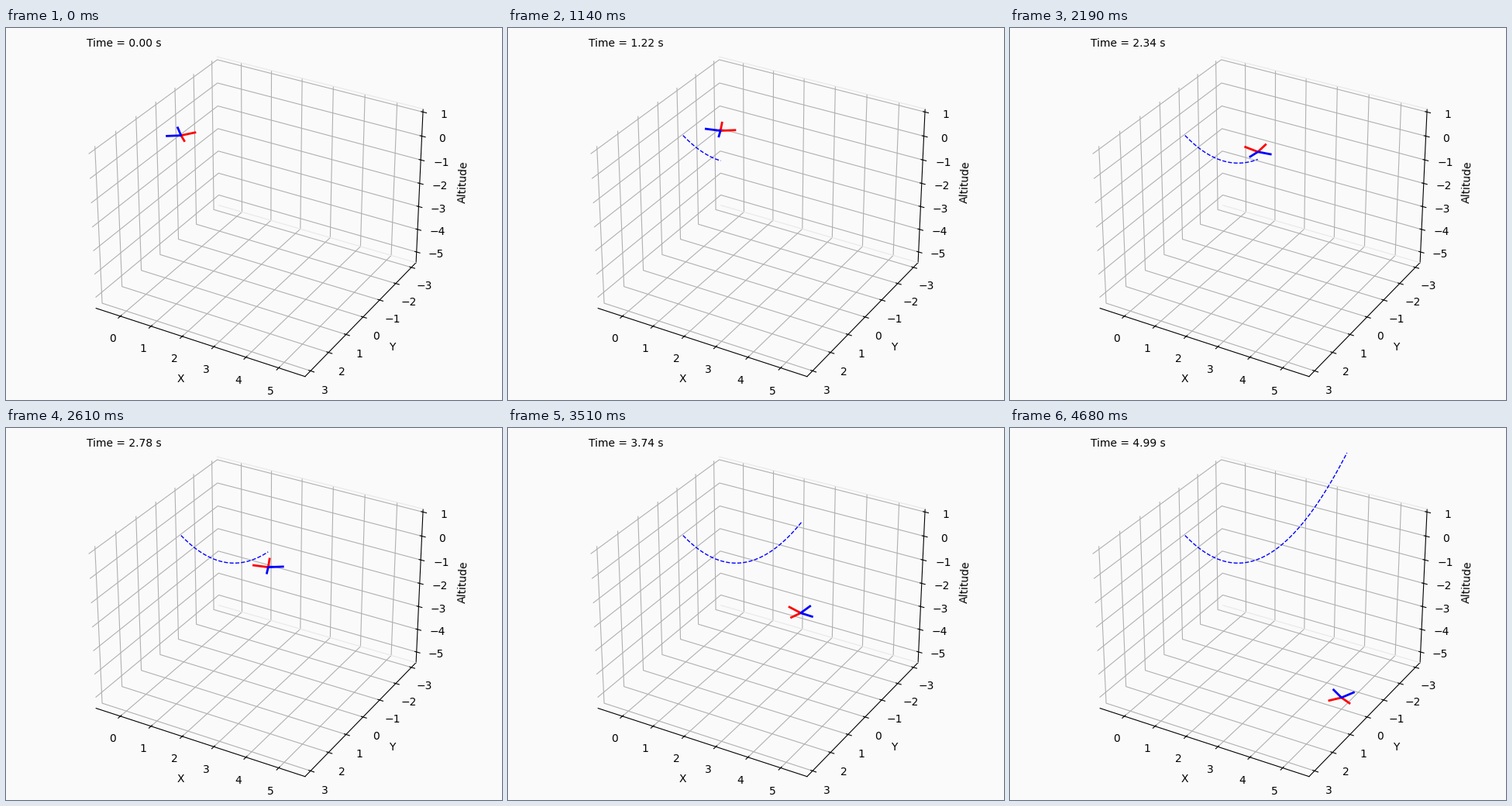
A matplotlib script that plays this animation: 640 px wide and 480 px high, repeating every 4.71 s.

```python
import numpy as np
import matplotlib.pyplot as plt
from matplotlib.animation import FuncAnimation

FRAMES, INTERVAL = 157, 30
STEP = 0.032            # simulated seconds per frame
SUBSTEPS = 8            # trail samples per frame
CLIMB, GRAVITY = 1.0, 0.8
YAW_RATE = -1.0
ARM, MOTOR_HEIGHT = 0.4 * np.sqrt(0.5), 0.05
BACKGROUND = "#fafafa"


def position(t):
    """Ballistic path: constant forward speed, parabolic altitude."""
    t = np.asarray(t, dtype=float)
    return np.array([t, 0 * t, CLIMB * t - GRAVITY * t**2 / 2])


def arms(t, side):
    """Motor, hub, motor polyline; side is 1 for front and -1 for rear."""
    body = np.array([[side, 0, side],
                     [-side, 0, side],
                     [1, 0, 1]]) * [[ARM], [ARM], [MOTOR_HEIGHT]]
    c, s = np.cos(YAW_RATE * t), np.sin(YAW_RATE * t)
    turn = np.array([[c, -s, 0], [s, c, 0], [0, 0, 1]])
    return turn @ body + position(t)[:, None]


fig = plt.figure(figsize=(6.4, 4.8), dpi=100, facecolor=BACKGROUND)
ax = fig.add_axes([0, 0, 1, 1], projection="3d", facecolor=BACKGROUND)

# Cube around the path with half a unit of room on each side
path = position(np.arange(FRAMES) * STEP)
low, high = path.min(axis=1), path.max(axis=1)
half = (high - low).max() / 2 + 0.5
mid = (low + high) / 2
(x0, y0, z0), (x1, y1, z1) = mid - half, mid + half
ax.set_xlim(x0, x1)
ax.set_ylim(y1, y0)
ax.set_zlim(z0, z1)
ax.set_xlabel("X")
ax.set_ylabel("Y")
ax.set_zlabel("Altitude")
for axis in (ax.xaxis, ax.yaxis, ax.zaxis):
    axis.set_pane_color((1, 1, 1, 0))

# Faint top and bottom edges of the back wall
for z in (z0, z1):
    ax.plot([x0, x1], [y0, y0], [z, z], color="#e8e8e8", lw=0.8)

front, = ax.plot([], [], [], color="red", lw=2)
rear, = ax.plot([], [], [], color="blue", lw=2)
trail, = ax.plot([], [], [], "--", color="blue", lw=1)
clock = ax.text2D(0.05, 0.95, "", transform=ax.transAxes)


def update(i):
    t = i * STEP
    front.set_data_3d(*arms(t, 1))
    rear.set_data_3d(*arms(t, -1))
    x, y, z = position(np.arange(i * SUBSTEPS) * STEP / SUBSTEPS)
    trail.set_data_3d(x, y, -z)     # trail is mirrored in altitude
    clock.set_text(f"Time = {t:.2f} s")
    return front, rear, trail, clock


anim = FuncAnimation(fig, update, frames=FRAMES, interval=INTERVAL,
                     repeat=True, repeat_delay=0, blit=False)
plt.show()
```
